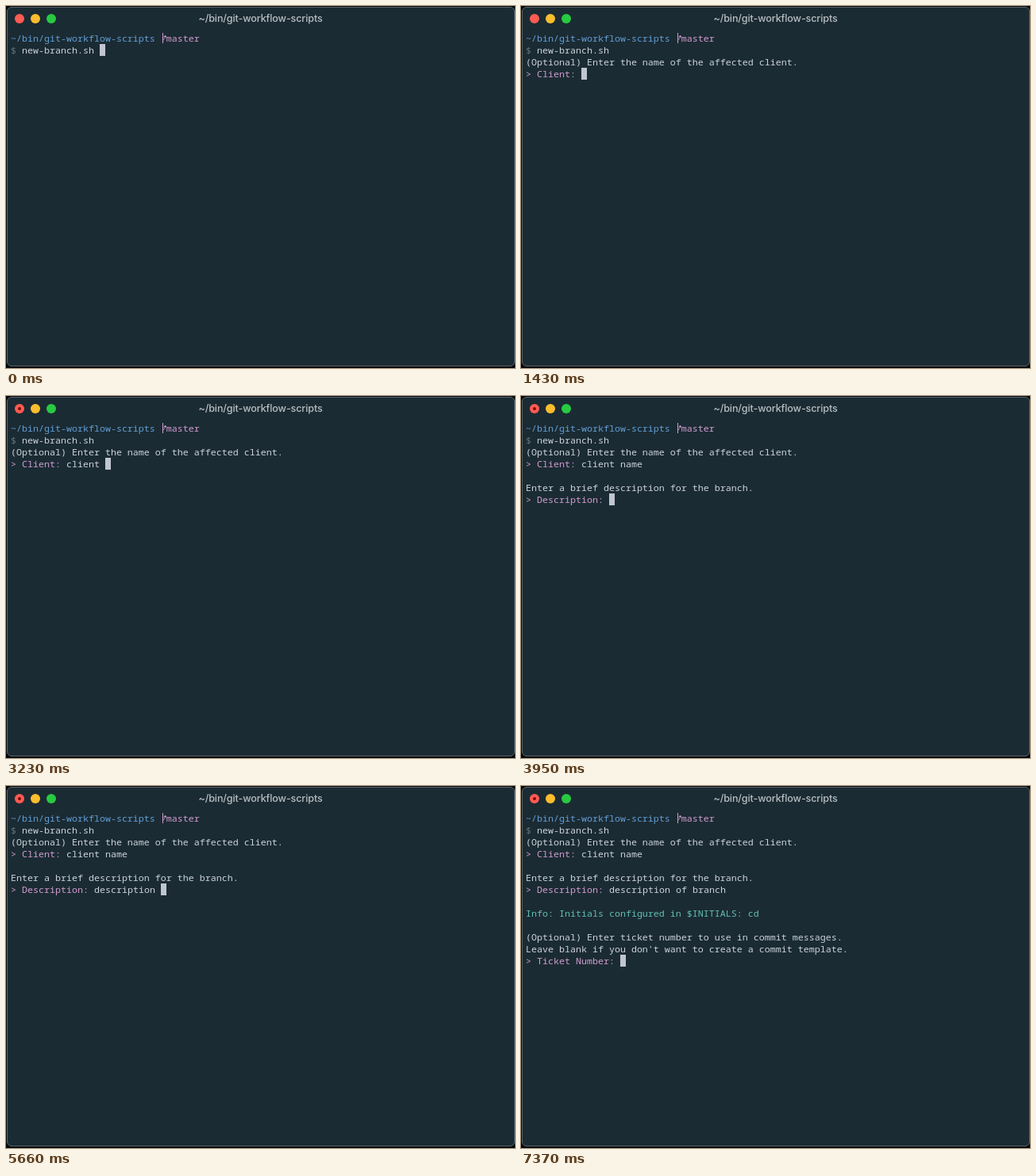
An HTML page that plays this animation: 641 by 457 pixels, repeating every 8 s.

```html
<!DOCTYPE html>
<html lang="en">
<head>
<meta charset="utf-8">
<title>Terminal</title>
<style>
html, body { margin: 0; width: 100%; height: 100%; overflow: hidden; background: #05080a; }
.window {
  position: absolute; left: 1px; top: 1px; width: 638px; height: 452px;
  border: 1px solid #5b676e; border-radius: 6px; background: #1b2b33;
}
.light { position: absolute; top: 10px; width: 12px; height: 12px; border-radius: 50%; }
#edited {
  position: absolute; left: 15px; top: 14px; width: 4px; height: 4px;
  border-radius: 50%; background: #7d0a08;
}
.title {
  position: absolute; left: 0; top: 6px; width: 641px; text-align: center;
  font: 500 12.6px/20px Inter, sans-serif; letter-spacing: -.13px; color: #b9bfc3;
}
.row {
  position: absolute; left: 6px; height: 15px; white-space: pre; color: #ccd3dc;
  font: 500 11.667px/15px "Noto Sans Mono", monospace; font-variant-ligatures: none;
}
.path { color: #629fd6; }
.dim { color: #65737a; }
.pink { color: #d19dd0; }
.teal { color: #62bfb5; }
#cursor { position: absolute; width: 7px; height: 15px; background: #c0c5d2; }
svg { position: absolute; left: 195px; top: 33px; }
</style>
</head>
<body>
<div class="window"></div>
<div class="light" style="left:11px;background:#ff5b53"></div>
<div class="light" style="left:31px;background:#fbbd2e"></div>
<div class="light" style="left:51px;background:#28ca42"></div>
<div id="edited"></div>
<div class="title">~/bin/git-workflow-scripts</div>
<div id="cursor"></div>
<div id="screen"></div>
<svg width="8" height="15" fill="none" stroke="#d19dd0">
  <path d="M2.5 1V14M2.5 11.5C2.5 8.5 5.5 9.5 5.5 5M3.8 6.5L5.5 4.2L7.2 6.5"/>
</svg>
<script>
const LOOP = 8000, CELL = 7, LINE = 15, LEFT = 6, TOP = 33;
const $ = id => document.getElementById(id);

// [appears at, row, [class, text]...]
const output = [
  [0, 0, ['path', '~/bin/git-workflow-scripts  '], ['pink', 'master']],
  [0, 1, ['dim', '$ '], ['', 'new-branch.sh ']],
  [1430, 2, ['', '(Optional) Enter the name of the affected client.']],
  [1430, 3, ['pink', '> Client: ']],
  [3950, 5, ['', 'Enter a brief description for the branch.']],
  [3950, 6, ['pink', '> Description: ']],
  [7370, 8, ['teal', 'Info: Initials configured in $INITIALS: cd']],
  [7370, 10, ['', '(Optional) Enter ticket number to use in commit messages.']],
  [7370, 11, ['', "Leave blank if you don't want to create a commit template."]],
  [7370, 12, ['pink', '> Ticket Number: ']]
];

// Typed answers with the moment each key lands
const typing = [
  { row: 3, col: 10, text: 'client name',
    keys: [2510, 2600, 2780, 2870, 2960, 3140, 3230, 3320, 3410, 3500, 3590] },
  { row: 6, col: 15, text: 'description of branch',
    keys: [4310, 4490, 4580, 4760, 4850, 4940, 5120, 5210, 5300, 5480, 5570, 5660,
      5840, 5840, 5930, 6110, 6290, 6380, 6470, 6650, 6650] }
];

// [time, row, column, visible]
const cursorSteps = [
  [0, 1, 16, true], [450, 1, 16, false], [900, 1, 16, true], [1340, 2, 0, true],
  [1430, 3, 10, true], [2420, 3, 10, false], [2510, 3, 10, true],
  [3950, 6, 15, true], [7370, 12, 17, true]
];

function addRow(row, col, spans) {
  const el = document.createElement('div');
  el.className = 'row';
  el.style.top = TOP + row * LINE + 'px';
  el.style.left = LEFT + col * CELL + 'px';
  for (const [cls, text] of spans) {
    const span = document.createElement('span');
    span.className = cls;
    span.textContent = text;
    el.append(span);
  }
  $('screen').append(el);
  return el;
}

const lines = output.map(([at, row, ...spans]) => ({ at, el: addRow(row, 0, spans) }));
for (const entry of typing) entry.el = addRow(entry.row, entry.col, []);

function draw(t) {
  for (const { at, el } of lines) el.style.visibility = t >= at ? 'visible' : 'hidden';
  let [, row, col, on] = cursorSteps.filter(step => t >= step[0]).pop();
  for (const entry of typing) {
    const count = entry.keys.filter(key => t >= key).length;
    entry.el.textContent = entry.text.slice(0, count);
    if (entry.row === row) col += count;
  }
  const cursor = $('cursor').style;
  cursor.left = LEFT + col * CELL + 'px';
  cursor.top = TOP + row * LINE + 'px';
  cursor.visibility = on ? 'visible' : 'hidden';
  $('edited').style.visibility = t >= 2150 ? 'visible' : 'hidden';
}

const start = performance.now();
function tick() {
  draw((performance.now() - start) % LOOP);
  requestAnimationFrame(tick);
}
tick();
</script>
</body>
</html>
```
